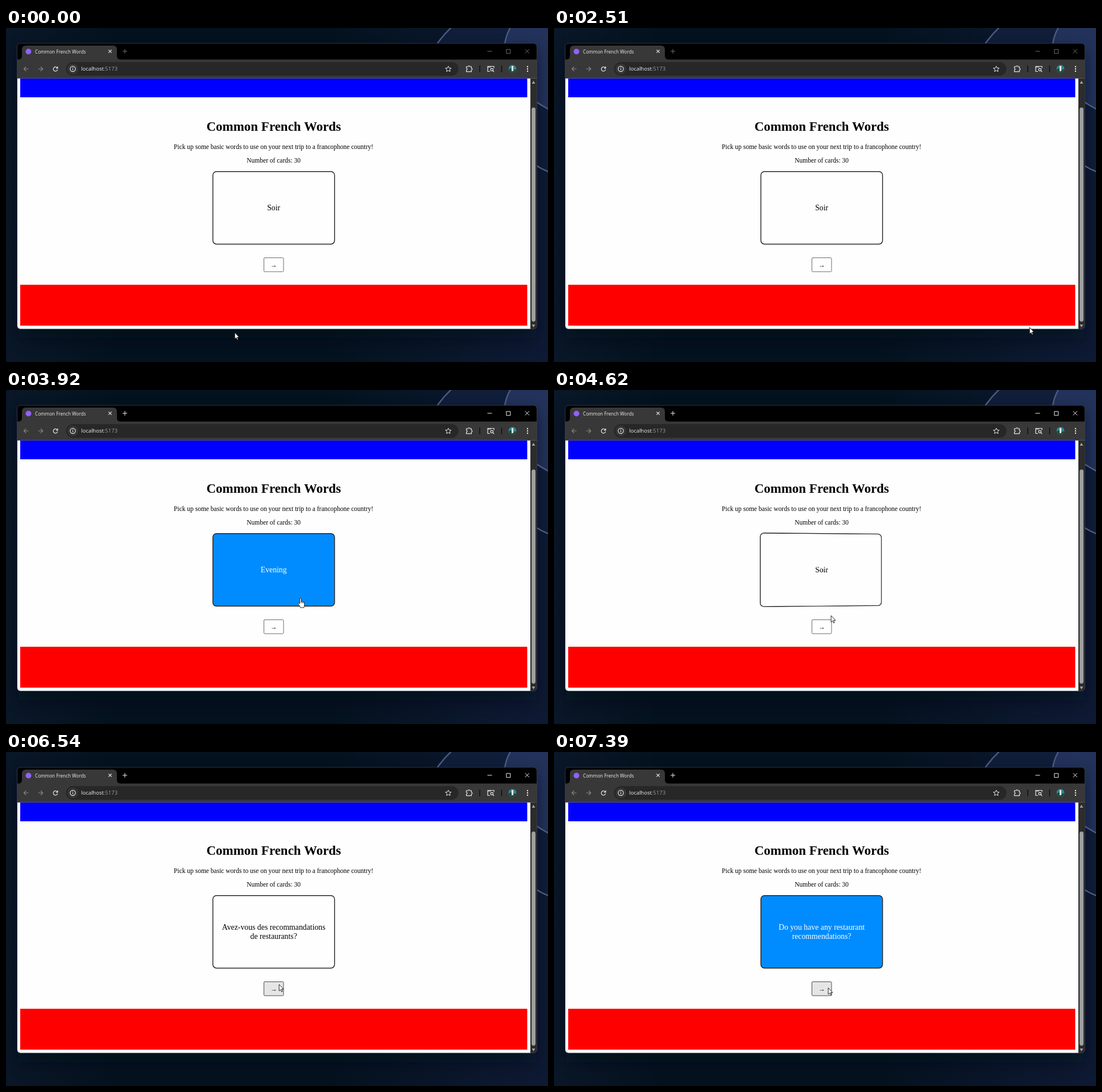
These frames come from a looping animation (953x588 px, 8000 ms). An HTML page:

```html
<!DOCTYPE html>
<html lang="en">
<head>
<meta charset="utf-8">
<title>Common French Words</title>
<style>
  html, body { margin: 0; width: 100%; height: 100%; overflow: hidden; background: #04101c; }
  #stage { position: absolute; left: 0; top: 0; width: 953px; height: 588px; overflow: hidden; }
  #stage > svg { position: absolute; left: 0; top: 0; }
  .ui { font-family: "Open Sans", "Noto Sans", sans-serif; }
  .page { font-family: "Liberation Serif", "Times New Roman", serif; text-anchor: middle; }
  .icon { fill: none; stroke: #e8e8e8; stroke-width: 1.2; }
  .dim { stroke: #8a8a8a; }
  #controls { fill: none; stroke: #707070; stroke-width: 1; }
  .focused #controls { stroke: #f4f4f4; }
  #button { fill: #fefefe; stroke: #6b6b6b; }
  .hover #button { fill: #e5e5e5; stroke: #4a4a4a; }

  #scene {
    position: absolute; left: 363.2px; top: 251.7px; width: 300px; height: 180px;
    transform: scale(.718); transform-origin: 0 0; perspective: 1000px;
  }
  #card { width: 100%; height: 100%; transform-style: preserve-3d; }
  .face {
    position: absolute; inset: 0; box-sizing: border-box;
    display: flex; align-items: center; justify-content: center;
    border: 2px solid #252525; border-radius: 10px; background: #fefefe; color: #000;
    font: 19.2px/22px "Liberation Serif", "Times New Roman", serif;
    text-align: center; white-space: pre; backface-visibility: hidden;
  }
  #back { background: #008cff; color: #fff; transform: rotateY(180deg); }
</style>
</head>
<body>
<div id="stage">
  <svg width="953" height="588" viewBox="0 0 953 588">
    <defs>
      <linearGradient id="night">
        <stop offset="0" stop-color="#0a1728"/>
        <stop offset=".2" stop-color="#04121f"/>
        <stop offset=".6" stop-color="#04121f"/>
        <stop offset="1" stop-color="#0e1a34"/>
      </linearGradient>
      <filter id="blur" x="-10%" y="-10%" width="120%" height="120%">
        <feGaussianBlur stdDeviation="14"/>
      </filter>
      <clipPath id="frame"><rect x="19.5" y="27" width="914" height="503" rx="6"/></clipPath>
      <clipPath id="round"><circle cx="890.5" cy="72" r="7"/></clipPath>
    </defs>

    <rect width="953" height="588" fill="url(#night)"/>
    <path d="M782 0Q768 13 758 27L933 243 953 253V0z" fill="#101e3a"/>
    <path d="M887 0Q879 13 877 27L933 131Q943 137 953 143V0z" fill="#22325a"/>
    <rect x="22" y="40" width="909" height="506" fill="#000c17" opacity=".6" filter="url(#blur)"/>
    <g fill="none" stroke="#4b5b7e" stroke-width="2.4">
      <path d="M783-1Q769 12 758 28M932 242Q943 249 954 253"/>
      <path d="M887-1Q879 13 877 28M932 130Q943 137 954 143"/>
    </g>

    <g clip-path="url(#frame)">
      <rect x="19" y="27" width="915" height="504"/>
      <path d="M19 89V55.500H22Q28 55.500 28 49V38Q28 31 35 31H188Q195 31 195 38V49Q195 55.500 201 55.500H934V89z" fill="#383838"/>
      <rect x="105.500" y="60" width="690" height="24" rx="12" fill="#272727"/>
      <rect x="19" y="88" width="915" height="1" fill="#555"/>
      <rect x="20" y="89" width="902" height="441" fill="#fefefe"/>
      <rect x="25" y="89" width="891.500" height="33" fill="#00f"/>
      <rect x="25" y="452" width="891.500" height="72" fill="#f00"/>
      <rect x="922" y="89" width="11" height="441" fill="#2c2c2c"/>
      <rect x="924.200" y="140" width="6.800" height="377" rx="3.400" fill="#9f9f9f"/>
      <path d="M924.500 98l3-5 3 5zM924.500 522l3 5 3-5z" fill="#9f9f9f"/>
    </g>
    <rect x="19.500" y="27" width="914" height="503" rx="6" fill="none" stroke="#3c434d" stroke-width=".8"/>

    <g class="ui">
      <circle cx="39.500" cy="41.500" r="5" fill="#8f62f5"/>
      <text x="51" y="44.500" font-size="8.150" fill="#f0f0f0">Common French Words</text>
      <text x="132" y="75.300" font-size="9.500" fill="#f2f2f2">localhost<tspan fill="#9c9c9c">:5173</tspan></text>
    </g>

    <g class="icon">
      <path d="M180.300 38.300l5.400 5.400m0-5.400l-5.400 5.400"/>
      <path class="dim" d="M39.500 72H31.500m3.800-3.800L31.500 72l3.800 3.800M56.700 72h8m-3.800-3.800l3.800 3.800-3.800 3.800"/>
      <path d="M90.400 70.500a3.800 3.800 0 1 0 .3 2.700M90.800 67.800v3h-3"/>
      <circle cx="117.500" cy="72" r="9.500" fill="#353535" stroke="none"/>
      <circle cx="117.500" cy="72" r="4.600"/>
      <path d="M117.500 71.500v2.800M117.500 69.300v1.200"/>
      <path stroke-width="1" d="M777.700 67l1.500 3.400 3.600.3-2.700 2.400.8 3.600-3.200-1.900-3.200 1.900.8-3.600-2.700-2.400 3.600-.3z"/>
      <path d="M809.500 68h3a1.500 1.500 0 0 1 3 0h2.800v3a1.500 1.500 0 0 1 0 3v2.800h-8.800v-2.800a1.500 1.500 0 0 0 0-3z"/>
      <path d="M851 76.500h-4v-9h11v3M847 69h6"/>
      <circle cx="854.300" cy="73.300" r="2.200"/>
      <path d="M856 75l2.300 2.300"/>
      <path d="M833 66v12M871.500 66v12" stroke="#080808"/>
    </g>
    <g clip-path="url(#round)">
      <rect x="883" y="65" width="15" height="14" fill="#2f8790"/>
      <path d="M883 73l5-2 4 3 6-2v7h-15z" fill="#214c3c"/>
      <path d="M889 67h3v9h-3z" fill="#e8eff0"/>
    </g>
    <g fill="#eee">
      <circle cx="917" cy="68" r="1.200"/><circle cx="917" cy="72" r="1.200"/><circle cx="917" cy="76" r="1.200"/>
    </g>
    <g id="controls">
      <path d="M205 41h8M209 37v8M846.500 41h8M879.800 37.800h7v7h-7zM912.800 37.300l7.200 7.200m0-7.200l-7.200 7.200"/>
    </g>

    <g class="page">
      <text x="470.800" y="181" font-size="22.980" font-weight="bold">Common French Words</text>
      <text x="470.500" y="213" font-size="11.490">Pick up some basic words to use on your next trip to a francophone country!</text>
      <text x="470.700" y="237.200" font-size="11.490">Number of cards: 30</text>
      <rect id="button" x="453.500" y="404.500" width="34.500" height="24.500" rx="1.500"/>
      <text x="470.700" y="420.700" font-size="11.500" font-family="Liberation Sans, Arial, sans-serif">→</text>
    </g>
  </svg>

  <div id="scene">
    <div id="card">
      <div class="face" id="front"></div>
      <div class="face" id="back"></div>
    </div>
  </div>

  <svg width="953" height="588" viewBox="0 0 953 588">
    <g id="cursor" fill="#fff" stroke="#111" stroke-width=".9" stroke-linejoin="round">
      <path id="arrow" d="M.2.2V11.600l2.600-2.400 1.800 4 1.700-.8-1.700-3.900H8z"/>
      <path id="hand" d="M3.400 2a1.300 1.300 0 0 1 2.600 0v4.600a1.200 1.200 0 0 1 2.200.2 1.200 1.200 0 0 1 2 .6 1 1 0 0 1 1.600.9v4.200c0 2-.8 2.600-1 4.600H4.600C4.300 15 1.800 12.700.6 10.600c-.6-1.300.9-2 1.800-1.100l1 1zM6 6.600v2.600M8.200 7v2.200M10.200 7.600v1.800"/>
    </g>
  </svg>
</div>

<script>
  const LOOP = 8000, FLIP = 190;
  // time, cursor x, cursor y: the screen is refreshed only at these moments
  const steps = [
    [0, 402, 536],
    [500, 440, 515], [650, 510, 482], [800, 566, 461], [950, 558, 466],
    [1790, 560, 440], [1930, 605, 390], [2080, 690, 420], [2220, 770, 470],
    [2370, 816, 508], [2510, 836, 527], [2660, 852, 548], [2800, 865, 565],
    [3080, 900, 540], [3220, 800, 480], [3360, 670, 420], [3500, 560, 384],
    [3640, 513, 366], [3770, 513, 366], [3920, 513, 366], [4070, 512, 366],
    [4220, 508, 365], [4360, 504, 364], [4490, 502, 364], [4620, 487, 397],
    [4770, 480, 409], [5380, 480, 409], [6540, 480, 409],
    [6940, 477, 372], [7090, 477, 366], [7240, 480, 392], [7390, 482, 415]
  ];
  const flips = [3722, 4472, 7066];
  const words = [
    [0, "Soir", "Evening"],
    [5380, "Où puis-je trouver un taxi?", "Where can I find a taxi?"],
    [6540, "Avez-vous des recommandations\nde restaurants?", "Do you have any restaurant\nrecommendations?"]
  ];

  const $ = id => document.getElementById(id);
  const stage = $("stage"), card = $("card"), cursor = $("cursor");
  const latest = (list, t) => list.filter(e => e[0] <= t).pop();

  // cubic-bezier(.25, .1, .25, 1)
  function ease(x) {
    if (x <= 0 || x >= 1) return x <= 0 ? 0 : 1;
    const curve = (a, b, s) => 3 * a * s * (1 - s) ** 2 + 3 * b * s * s * (1 - s) + s ** 3;
    let lo = 0, hi = 1;
    for (let i = 0; i < 24; i++) {
      const mid = (lo + hi) / 2;
      if (curve(.25, .25, mid) < x) lo = mid; else hi = mid;
    }
    return curve(.1, 1, lo);
  }

  function angle(t) {
    return flips.reduce((sum, start, i) =>
      sum + (i % 2 ? -180 : 180) * ease((t - start) / FLIP), 0);
  }

  let shown = -1;
  function draw(now) {
    const [t, x, y] = latest(steps, now % LOOP);
    if (t !== shown) {
      shown = t;
      const [, front, back] = latest(words, t);
      const focused = t >= 3640;
      const hand = x > 363 && x < 579 && y > 251 && y < 381;
      const hover = x > 453 && x < 487 && y > 404 && y < 429;
      $("front").textContent = front;
      $("back").textContent = back;
      card.style.transform = `rotateY(${angle(t).toFixed(2)}deg)`;
      stage.classList.toggle("focused", focused);
      stage.classList.toggle("hover", hover);
      cursor.setAttribute("transform", `translate(${x} ${y})`);
      $("hand").style.display = hand ? "" : "none";
      $("arrow").style.display = hand ? "none" : "";
    }
  }

  const began = performance.now();
  function tick() {
    draw(performance.now() - began);
    requestAnimationFrame(tick);
  }
  tick();
</script>
</body>
</html>
```
